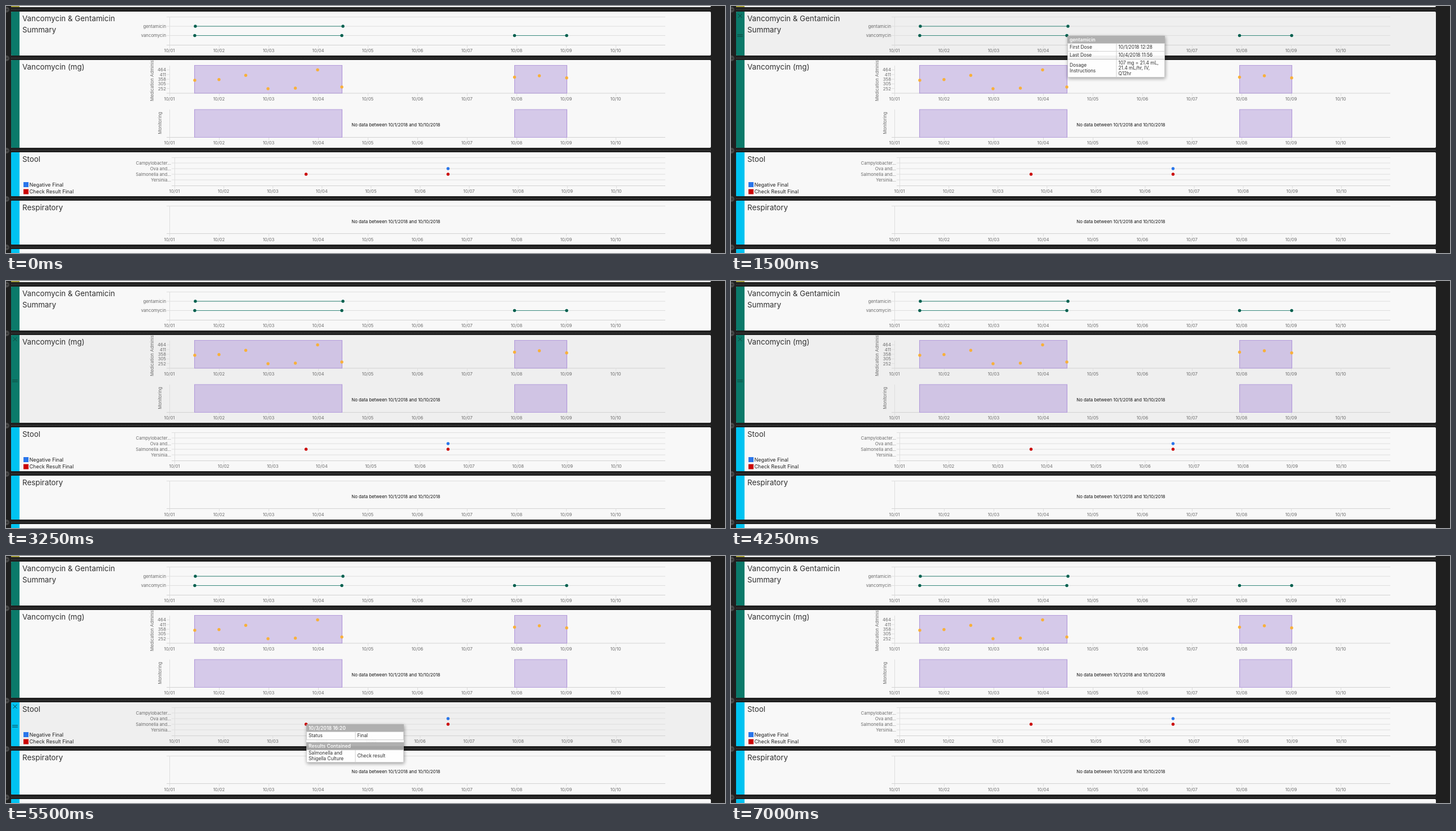
An HTML page for the animation above (8000 ms loop, 1276 by 439 pixels).

```html
<!DOCTYPE html>
<html lang="en">
<head>
<meta charset="utf-8">
<title>Patient timeline</title>
<style>
html, body { margin: 0; width: 100%; height: 100%; overflow: hidden; background: #1f1f1f; }
svg { display: block; width: 1276px; height: 439px; font: 7.8px Inter, "Open Sans", sans-serif; }
.title { font-size: 13.35px; fill: #303030; }
.axis { fill: #6c6c6c; }
.message { fill: #111; }
.legend { font-size: 9px; fill: #222; }
.tip { font-size: 8.35px; fill: #222; }
.tiphead { font-size: 8.5px; font-weight: 600; fill: #fff; }
.tooltip { filter: drop-shadow(1px 2px 3px rgba(0,0,0,.4)); }
</style>
</head>
<body>
<svg id="stage" viewBox="0 0 1276 439"></svg>
<script>
const TEAL = '#0b7a6a', CYAN = '#00c3f1', DARK_TEAL = '#00604f', GRID = '#dedede';
const RED = '#cb0000', BLUE = '#2a76ea', ORANGE = '#f8b03a';
const LOOP = 8000;

const rect = (x, y, w, h, fill, extra = '') =>
  `<rect x="${x}" y="${y}" width="${w}" height="${h}" fill="${fill}" ${extra}/>`;
const line = (x1, y1, x2, y2, color = GRID, extra = '') =>
  `<path d="M${x1} ${y1}L${x2} ${y2}" stroke="${color}" ${extra}/>`;
const dot = (x, y, fill) => `<circle cx="${x}" cy="${y}" r="2.7" fill="${fill}"/>`;
// y is the middle of the capitals
const text = (x, y, string, style, anchor = 'start', size = 7.8) =>
  `<text x="${x}" y="${y + size * 0.363}" class="${style}" text-anchor="${anchor}">${string}</text>`;
const title = (y, string) => text(29, y, string, 'title', 'start', 13.35);

function dateAxis(left, top, bottom, labelY) {
  const step = (1170 - left) / 10;
  let out = line(left + .5, top, left + .5, bottom + 5) +
    line(left - 5, bottom, 1170, bottom, '#d2d2d2');
  for (let day = 0; day < 10; day++) {
    const x = left + day * step;
    out += line(x + .5, bottom, x + .5, bottom + 5) +
      text(x, labelY, '10/' + String(day + 1).padStart(2, '0'), 'axis', 'middle');
  }
  return out;
}

const rows = (left, ys) => ys.map(y => line(left - 5, y, 1170, y)).join('');
const noData = y => text(692, y, 'No data between 10/1/2018 and 10/10/2018', 'message', 'middle');
const vertical = (x, y, string, anchor) =>
  `<text transform="translate(${x} ${y}) rotate(-90)" class="axis" text-anchor="${anchor}">${string}</text>`;

function panel(id, y, h, color) {
  const mid = y + h / 2 + 3.5;
  return rect(9, y, 1242, h, '#f8f8f8', `rx="2" id="panel-${id}"`) +
    `<path d="M24 ${y}H11q-2 0-2 2V${y + h - 2}q0 2 2 2H24z" fill="${color}"/>` +
    `<path id="icons-${id}" d="M12.5 ${y + 4}l7 7m0-7l-7 7M11 ${mid - 1.5}h10m-10 3h10" stroke="#15302d" fill="none"/>`;
}

function separator(id, y) {
  return `<g id="separator-${id}">` +
    line(9, y, 1251, y, '#606060', 'stroke-dasharray="1.2 1.4"') +
    `<circle cx="1" cy="${y + .5}" r="5" fill="#484848"/>` +
    line(-2, y + .5, 4, y + .5, '#1f1f1f') + '</g>';
}

function dose(x1, x2, y) {
  return line(x1, y, x2, y, '#37897c', 'stroke-width="1.2"') + dot(x1, y, DARK_TEAL) + dot(x2, y, DARK_TEAL);
}

const summary = () => panel('summary', 10, 78, TEAL) +
  title(22, 'Vancomycin &amp; Gentamicin') + title(42, 'Summary') +
  rows(290, [19.5, 36, 52.5]) + dateAxis(290, 19.5, 69.5, 79.5) +
  text(284, 36, 'gentamicin', 'axis', 'end') + text(284, 52.5, 'vancomycin', 'axis', 'end') +
  dose(336, 598, 36) + dose(335, 596, 52.5) + dose(902.5, 995, 52.5);

function vancomycin() {
  const levels = [464, 411, 358, 305, 252];
  const doses = [[335, 132], [378, 130.7], [425.5, 123.3], [465, 147], [513.5, 146], [553, 113.5],
    [596, 144], [902.5, 126.5], [946.5, 124], [995, 127.7]];
  const courses = y => [[334.5, 262], [902.5, 93]].map(([x, w]) =>
    rect(x, y, w, 49.5, 'rgba(160,130,210,.4)', 'stroke="#b49ddb"') +
    line(x + .2, y, x + .2, y + 49.5, '#b49ddb') + line(x + w - .2, y, x + w - .2, y + 49.5, '#b49ddb')).join('');
  return panel('vancomycin', 96, 156, TEAL) + title(108, 'Vancomycin (mg)') +
    dateAxis(290, 106, 155, 165.5) + dateAxis(290, 184, 233.5, 243.5) +
    levels.map((level, i) => line(285, 113.5 + i * 8.3, 290, 113.5 + i * 8.3) +
      text(284, 113.5 + i * 8.3, level, 'axis', 'end')).join('') +
    courses(105.5) + courses(184) + doses.map(([x, y]) => dot(x, y, ORANGE)).join('') +
    `<g clip-path="url(#clip)">${vertical(261.5, 169, 'Medication Administrations', 'start')}</g>` +
    vertical(275.5, 208, 'Monitoring', 'middle') + noData(211);
}

const stool = () => panel('stool', 260, 78, CYAN) + title(272, 'Stool') +
  rows(299, [269.5, 279, 289, 299, 309]) + dateAxis(299, 269.5, 319.5, 329) +
  ['Campylobacter...', 'Ova and...', 'Salmonella and...', 'Yersinia...']
    .map((name, i) => text(293, 279 + i * 10, name, 'axis', 'end')).join('') +
  rect(31, 313, 9, 9, BLUE) + text(41.5, 317.7, 'Negative Final', 'legend', 'start', 9) +
  rect(31, 325.5, 9, 9, RED) + text(41.5, 330.2, 'Check Result Final', 'legend', 'start', 9) +
  dot(532.5, 299, RED) + dot(784.5, 289, BLUE) + dot(784.5, 299, RED);

const respiratory = () => panel('respiratory', 346, 78, CYAN) + title(358, 'Respiratory') +
  rows(290, [355.5]) + dateAxis(290, 355.5, 404.5, 415) + noData(382.7);

const tipHead = (x, y, w, string) =>
  rect(x, y, w, 13, '#adadad') + text(x + 4, y + 6.8, string, 'tiphead', 'start', 8.5);

function tipRow(x, y, w, h, left, right) {
  const cell = (cx, lines) => lines.map((string, i) =>
    text(cx, y + h / 2 + (i - (lines.length - 1) / 2) * 9.5, string, 'tip', 'start', 8.35)).join('');
  return rect(x + .5, y + .5, w - 1, h, '#fff', 'stroke="#d0d0d0"') +
    line(x + w / 2 + .5, y, x + w / 2 + .5, y + h, '#d0d0d0') +
    cell(x + 4, left) + cell(x + w / 2 + 4, right);
}

const doseTip = () => `<g id="tip-dose" class="tooltip" opacity=".94">` +
  tipRow(597, 66, 173, 14, ['First Dose'], ['10/1/2018 12:28']) +
  tipRow(597, 80, 173, 14, ['Last Dose'], ['10/4/2018 11:56']) +
  tipRow(597, 94, 173, 32, ['Dosage', 'Instructions'], ['107 mg = 21.4 mL,', '21.4 mL/hr, IV,', 'Q12hr']) +
  tipHead(597, 53, 173, 'gentamicin') + '</g>';

const stoolTip = () => `<g id="tip-stool" class="tooltip" opacity=".94">` +
  rect(533, 299, 173, 67, '#fafafa') +
  tipRow(533, 312, 173, 14, ['Status'], ['Final']) +
  tipRow(533, 344, 173, 22, ['Salmonella and', 'Shigella Culture'], ['Check result']) +
  tipHead(533, 299, 173, '10/3/2018 16:20') + tipHead(533, 331, 173, 'Results Contained') + '</g>';

const $ = id => document.getElementById(id);

$('stage').innerHTML = '<clipPath id="clip"><path d="M9 96H1251V252H9z"/></clipPath>' +
  rect(0, 0, 1276, 439, '#1f1f1f') +
  rect(9, -10, 1242, 12, '#f8f8f8', 'rx="2"') + rect(9, 0, 15, 2, '#a8a23a') +
  [6, 92.5, 256.5, 342.5, 428.5].map((y, i) => separator(i, y)).join('') +
  summary() + vancomycin() + stool() + respiratory() +
  panel('other', 432, 78, CYAN) + title(444, 'Other') + doseTip() + stoolTip();

// [start, end, icon strength] and [start, end] in ms
const icons = {
  summary: [[1000, 2750, .85]],
  vancomycin: [[750, 1000, .5], [2750, 4500, .75]],
  stool: [[4750, 7000, .9]],
  respiratory: [],
  other: []
};
const shaded = { summary: [1250, 2500], vancomycin: [3000, 4500], stool: [5000, 6750] };
const tips = { dose: [1500, 2500], stool: [5500, 6750] };

const within = (t, [start, end]) => t >= start && t < end;

function draw(t) {
  for (const id in icons) {
    const span = icons[id].find(s => within(t, s));
    $('icons-' + id).setAttribute('opacity', span ? span[2] : 0);
  }
  for (const id in shaded) $('panel-' + id).setAttribute('fill', within(t, shaded[id]) ? '#efefef' : '#f8f8f8');
  for (const id in tips) $('tip-' + id).setAttribute('display', within(t, tips[id]) ? 'inline' : 'none');
  $('separator-1').style.filter = within(t, [750, 1000]) ? 'brightness(2)' : 'none';
}

const start = performance.now();
function tick() {
  draw((performance.now() - start) % LOOP);
  requestAnimationFrame(tick);
}
tick();
</script>
</body>
</html>
```
